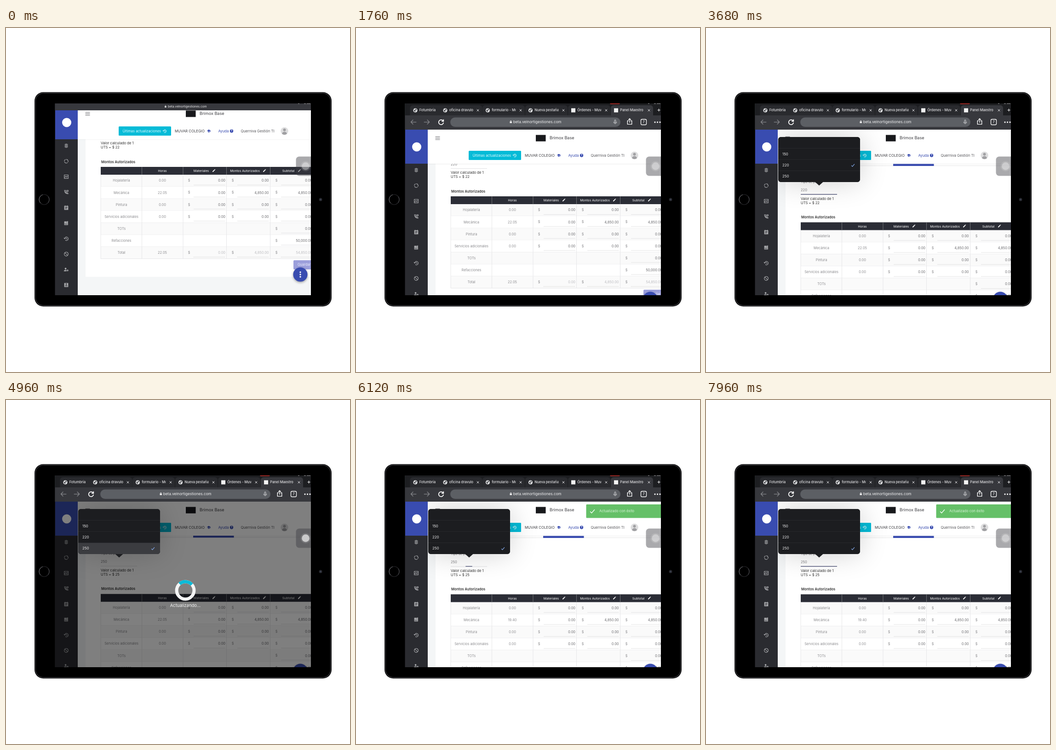
Recreate the animation shown at these times as an HTML page with a canvas. Size 748 px wide and 748 px high, loop 8000 ms.

```html
<!DOCTYPE html>
<html lang="es">
<head>
<meta charset="utf-8">
<style>
html, body { margin: 0; width: 100%; height: 100%; overflow: hidden; background: #fff; }
canvas { display: block; width: 100vw; height: 100vh; }
</style>
</head>
<body>
<canvas id="stage"></canvas>
<script>
const SIZE = 748, LOOP = 8000, BLUE = '#394cb0', DARK = '#2a2b30';
const canvas = document.getElementById('stage');
const g = canvas.getContext('2d');
const ratio = window.devicePixelRatio || 1;
canvas.width = canvas.height = SIZE * ratio;

const clamp = v => Math.max(0, Math.min(1, v));
const smooth = (t, a, b) => { const p = clamp((t - a) / (b - a)); return p * p * (3 - 2 * p); };
const mix = (a, b, p) => a + (b - a) * p;

function text(s, x, y, size, color, align = 'left', weight = 400) {
  g.font = `${weight} ${size}px Inter, Roboto, sans-serif`;
  g.textAlign = align;
  g.textBaseline = 'middle';
  g.fillStyle = color;
  g.fillText(s, x, y);
}
function rect(x, y, w, h, color, r = 0) {
  g.fillStyle = color;
  g.beginPath();
  g.roundRect(x, y, w, h, r);
  g.fill();
}
function circle(x, y, r, color) {
  g.fillStyle = color;
  g.beginPath();
  g.arc(x, y, r, 0, 7);
  g.fill();
}
function line(points, color, width = 1, dash = []) {
  g.strokeStyle = color;
  g.lineWidth = width;
  g.setLineDash(dash);
  g.beginPath();
  for (let i = 0; i < points.length; i += 2) g.lineTo(points[i], points[i + 1]);
  g.stroke();
  g.setLineDash([]);
}
function arc(x, y, r, from, to, color, width) {
  g.strokeStyle = color;
  g.lineWidth = width;
  g.beginPath();
  g.arc(x, y, r, from, to);
  g.stroke();
}
function layer(alpha, draw) {
  if (alpha <= 0) return;
  g.save();
  g.globalAlpha = alpha;
  draw();
  g.restore();
}

// Icons live on a 24-unit grid; true means filled instead of stroked.
const icons = {
  signal: ['M8 3h8v18H8zM10 7a2 2 0 1 0 4 0a2 2 0 1 0-4 0M10 12a2 2 0 1 0 4 0a2 2 0 1 0-4 0M10 17a2 2 0 1 0 4 0a2 2 0 1 0-4 0M3 5h4v4zM3 11h4v4zM3 16h4v4zM21 5h-4v4zM21 11h-4v4zM21 16h-4v4z', true],
  donut: ['M12 3.5A8.5 8.5 0 0 1 19.4 16.2M18 18A8.5 8.5 0 0 1 4 14.9M3.6 13A8.5 8.5 0 0 1 10 3.7'],
  graph: ['M3 4h18v16H3zM5 15l5-5 4 4 5-5'],
  call: ['M4 4c0 9 6 15 16 16v-4l-4-1-2 2c-3-1-5-4-6-6l2-2-1-5zM14 4h7v5h-4l-3 3z'],
  notes: ['M3 4h3V2h2v2h8V2h2v2h3v18H3zM7 8v2h10V8zM7 12v2h10v-2zM7 16v2h7v-2z', true],
  report: ['M3 4h12l-4 6 3 2 6-5v14H3zM6 13v5h2v-5zM10 15v3h2v-3zM14 14v4h2v-4zM18 2l3 3-6 6-3 1 1-4z', true],
  history: ['M5 13a8 8 0 1 1 3 6M1 9l4 4 4-3M13 8v5l4 2'],
  block: ['M3 12a9 9 0 1 0 18 0a9 9 0 1 0-18 0M6 6l12 12'],
  person: ['M5 8a4 4 0 1 0 8 0a4 4 0 1 0-8 0M1 20c0-5 4-6 8-6l4 1v5zM14 16a4 4 0 1 0 8 0a4 4 0 1 0-8 0M16.5 16a1.5 1.5 0 1 0 3 0a1.5 1.5 0 1 0-3 0', true],
  badge: ['M3 3h18v18H3zM9 8a3 3 0 1 0 6 0a3 3 0 1 0-6 0M6 17h12c0-5-12-5-12 0', true],
  cap: ['M12 3L1 9l11 6 9-5v7h2V9zM5 13v4l7 4 7-4v-4l-7 4z', true],
  pencil: ['M3 17l12-12 4 4-12 12H3zM16 4l2-2 4 4-2 2z', true],
  lock: ['M4 10h2V7a6 6 0 0 1 12 0v3h2v12H4zM9 10h6V7a3 3 0 0 0-6 0z', true],
  mic: ['M9 5a3 3 0 0 1 6 0v6a3 3 0 0 1-6 0zM5 11a7 7 0 0 0 14 0M12 18v4'],
  share: ['M8 9H4v13h16V9h-4M12 16V2M7 6l5-5 5 5'],
  reload: ['M19 7a9 9 0 1 0 2 7M21 2v7h-7'],
  check: ['M3 13l6 6L21 5'],
  close: ['M5 5l14 14M19 5L5 19'],
  back: ['M22 12H3M11 4l-8 8 8 8'],
  forward: ['M2 12h19M13 4l8 8-8 8']
};
function icon(name, x, y, size, color, width = 2.3) {
  const [path, filled] = icons[name], shape = new Path2D(path);
  g.save();
  g.translate(x - size / 2, y - size / 2);
  g.scale(size / 24, size / 24);
  g.fillStyle = g.strokeStyle = color;
  g.lineWidth = width;
  if (filled) g.fill(shape, 'evenodd'); else g.stroke(shape);
  g.restore();
}

function device() {
  rect(62, 139.5, 646, 466, '#0b0b0c', 19);
  g.strokeStyle = '#4a4a4e';
  g.lineWidth = 1;
  g.beginPath();
  g.roundRect(64, 141.5, 642, 462, 17.5);
  g.stroke();
  rect(65, 142.5, 640, 460, '#000', 17);
  arc(83, 373, 11, 0, 7, '#252528', 1.2);
  arc(83, 373, 11, 2.4, 4.4, '#77777b', 1);
  arc(83, 373, 11, -.6, .7, '#55555a', 1);
  circle(684, 373, 3.5, '#25262b');
  circle(684, 373, 1.6, '#414657');
}

const columns = [206, 295.5, 385, 479.5, 574.5, 680];
const money = [[398, 477], [493, 571.5], [588, 666]];

function table(c, hours) {
  const rows = [
    ['Hojalatería', '0.00', '0.00', '0.00', '0.00'],
    ['Mecánica', hours, '0.00', '4,850.00', '4,850.00'],
    ['Pintura', '0.00', '0.00', '0.00', '0.00'],
    ['Servicios adicionales', '0.00', '0.00', '0.00', '0.00'],
    ['TOTs', '', '', '', '0.00'],
    ['Refacciones', '', '', '', '50,000.00'],
    ['Total', hours, '0.00', '4,850.00', '54,850.00']
  ];
  rows.forEach((row, i) => {
    const top = c + 17 + i * 26.1, y = top + 13.2, total = i === 6;
    rect(206, top, 474, 26.1, i % 2 ? '#fff' : '#fafafa');
    line([206, top + 26.1, 680, top + 26.1], '#e6e6e8');
    text(row[0], 251, y, 7.4, '#8d8d90', 'center');
    text(row[1], 340, y, 7.4, '#8d8d90', 'center');
    money.forEach(([left, right], k) => {
      const value = row[k + 2];
      if (!value) return;
      text('$', left, y, 7.2, '#8a8a8d', 'center');
      text(value, right, y, 7.4, total ? '#bcbcc0' : '#67676b', 'right');
      line([left + 10, y + 9.3, right, y + 9.3], total ? '#bbb' : '#dcdcde', .8, total ? [1.5, 1.5] : []);
    });
  });
  columns.forEach(x => line([x, c + 17, x, c + 199.7], '#e6e6e8'));
  rect(206, c, 474, 17, '#2b2d36');
  columns.slice(1, 5).forEach(x => line([x, c, x, c + 17], '#85868a', .8));
  [['Horas', 340], ['Materiales', 424.5, 452], ['Montos Autorizados', 519.5, 562], ['Subtotal', 614, 638]]
    .forEach(([label, x, pen]) => {
      text(label, x, c + 9, 6.8, '#fff', 'center');
      if (pen) icon('pencil', pen, c + 8, 8, '#fff');
    });
}

function content(c, rate, focus, hours) {
  rect(156, 164, 507, 417, '#f4f6f7');
  rect(173, 164, 490, c + 239 - 164, '#fff');
  line([173, c - 123, 663, c - 123], '#e4e4e6');
  rect(407, c - 127, 88.5, 4.5, BLUE);
  text('Tipo de pago', 206, c - 88, 7, '#77777a');
  text(rate, 206, c - 69.5, 7.5, '#7d7d80');
  line([206, c - 60.5, 285, c - 60.5], '#d9d9dc', .8);
  if (focus > 0) line([245.5 - 39.5 * focus, c - 60.8, 245.5 + 39.5 * focus, c - 60.8], '#454a70', 1.3);
  text('Valor calculado de 1', 206, c - 51, 7.6, '#333');
  text('UTS = $ ' + rate / 10, 206, c - 42, 7.6, '#333');
  text('Montos Autorizados', 207, c - 10.7, 7.6, '#333', 'left', 600);
  table(c, hours);
  rect(625, c + 203, 60, 20, '#9c9fdb', 2);
  text('Guardar', 634, c + 213, 7.5, '#e9eafa');
}

function header(h) {
  layer(1, () => {
    g.shadowColor = 'rgba(0,0,0,.14)';
    g.shadowBlur = 3 * ratio;
    rect(156, h, 507, 74, '#fff');
  });
  [15.3, 18.5, 21.7].forEach(d => line([172.5, h + d, 182.5, h + d], '#66666a'));
  rect(391, h + 11.5, 21.5, 14, '#18191c');
  text('Brimox Base', 421, h + 18.2, 9.1, '#3c3c40');
  rect(245, h + 46, 114, 20, '#05bbd7', 1.5);
  text('Últimas actualizaciones', 253.5, h + 56.3, 7.5, '#e4fbff');
  icon('history', 345, h + 56, 9.5, '#fff');
  text('MUVAR COLEGIO', 367, h + 56.3, 7.8, '#3c3c40');
  icon('cap', 441, h + 56, 8.5, BLUE);
  text('Ayuda', 461.5, h + 56.3, 7.8, BLUE);
  circle(490.5, h + 56, 3.7, BLUE);
  text('?', 490.5, h + 56.3, 6, '#fff', 'center', 700);
  text('Querniva Gestión TI', 510.5, h + 56.3, 7.8, '#57575b');
  layer(1, () => {
    g.beginPath();
    g.arc(605.5, h + 56, 8.3, 0, 7);
    g.clip();
    rect(596, h + 46, 20, 20, '#dededf');
    circle(605.5, h + 53.5, 3, '#a0a0a3');
    circle(605.5, h + 63, 5.5, '#a0a0a3');
  });
}

const menu = ['signal', 'donut', 'graph', 'call', 'notes', 'report', 'history', 'block', 'person', 'badge'];
function sidebar(h) {
  rect(106, 164, 50, 417, DARK);
  rect(107, h, 49, 74, BLUE);
  circle(132, h + 37.5, 10, '#fff');
  menu.forEach((name, i) => icon(name, 131, h + 88 + i * 33.65, 11.5, '#a9aaad'));
}

function floatingButton(h) {
  layer(1, () => {
    g.shadowColor = 'rgba(0,0,0,.35)';
    g.shadowBlur = 5 * ratio;
    g.shadowOffsetY = 2 * ratio;
    circle(640, h + 368, 15.6, BLUE);
  });
  [-5, 0, 5].forEach(d => circle(640, h + 368 + d, 1.7, '#fff'));
}

const tabs = [
  ['Fotumbria', 129], ['oficina dravulo', 194, 265], ['formulario - Mo', 286.5, 358],
  ['Nueva pestaña', 379.5, 451], ['Órdenes - Muv', 472.5, 544], ['Panel Maestro', 565.5, 637]
];
function globe(x, y) {
  circle(x, y, 4.6, '#dfe0e2');
  g.fillStyle = '#393a3e';
  g.fill(new Path2D(`M${x - 3.4} ${y - 1.5}l3 1 1 2-2 2zM${x} ${y - 3.6}l3 1.5-1 2-2-1z`));
}
function toolbar(h, p) {
  const bottom = Math.max(179, h);
  rect(106, 164, 557, bottom - 164, '#37383d');
  layer(clamp((p - .5) / .4), () => {
    g.translate(0, h - 221);
    rect(106, 164, 557, 26, '#1d1e21');
    tabs.forEach(([label, x, close], i) => {
      const ink = '#e4e4e6', last = i === 5;
      rect(x - 11.5, 168, 92, last ? 24 : 22, last ? '#37383d' : '#292a2e', [6, 6, 0, 0]);
      if (i > 3) rect(x - 4.5, 174.5, 9, 9, '#f2f2f2'); else globe(x, 179);
      layer(1, () => {
        g.beginPath();
        g.rect(x, 168, 61, 22);
        g.clip();
        text(label, x + 8.7, 179.2, 7.4, ink, 'left', 500);
      });
      if (close) icon('close', close, 179, 8, ink, 3);
    });
    text('+', 658.5, 178.5, 13, '#fff', 'center');
    icon('back', 125, 204.5, 15, '#85868a', 2);
    icon('forward', 154, 204.5, 15, '#85868a', 2);
    icon('reload', 185, 204.5, 14, '#fff', 3);
    rect(205, 194.5, 370, 20.5, '#5c5f64', 10.2);
    icon('mic', 563.5, 204.5, 11, '#c4c5c8', 2.4);
    icon('share', 595, 203.5, 14, '#fff', 2.4);
    g.strokeStyle = '#fff';
    g.lineWidth = 1.3;
    g.beginPath();
    g.roundRect(619.5, 198.5, 12, 12, 2.5);
    g.stroke();
    text('7', 625.5, 205, 7, '#fff', 'center', 500);
    [650, 655.5, 661].forEach(x => circle(x, 204.8, 1.6, '#fff'));
  });
  const address = 'beta.velnortigestiones.com', y = 171 + 14.5 * p + 19 * p * p;
  const size = 6.6 + .4 * p + 1.2 * p * p;
  text(address, 394.2, y, size, '#f2f2f3', 'center');
  icon('lock', 394.2 - g.measureText(address).width / 2 - 5, y - .4, size * .8, '#f2f2f3');
  layer(smooth(p, .1, .4), () => rect(552, 163, 22, 2.6, '#c9302c', [0, 0, 5, 5]));
  [[635, 3], [648, 4], [654, 8]].forEach(([x, w]) => rect(x, 164, w, 1, '#a0a0a3'));
}

function popup(choice, pressed) {
  layer(g.globalAlpha, () => {
    g.beginPath();
    g.rect(156, 221, 507, 360);
    g.clip();
    g.shadowColor = 'rgba(0,0,0,.19)';
    g.shadowBlur = 60 * ratio;
    rect(157, 237, 178, 98, '#1c1d20', 6);
  });
  g.fillStyle = '#1c1d20';
  g.fill(new Path2D('M237 334.5h18l-9 8z'));
  rect(157, 237, 178, 98, '#1c1d20', 6);
  if (pressed) rect(157, 310.5, 178, 24.5, '#3b3c40', [0, 0, 6, 6]);
  [261.5, 286, 310.5].forEach(y => line([157, y, 335, y], '#2b2c30', .8));
  [150, 220, 250].forEach((n, i) => {
    const y = 274.2 + i * 24.4;
    text(n, 166, y, 7.8, '#ededee');
    if (n === choice) icon('check', 319.5, y, 9, '#86aef2', 3);
  });
}

function loading(t) {
  const turn = (t - 4960) / 1000 * 2 * Math.PI + .05;
  arc(390, 414, 18.9, 0, 7, '#f4f4f4', 7);
  arc(390, 414, 18.9, turn - Math.PI * .75, turn - Math.PI * .25, '#0bbbd8', 7);
  text('Actualizando...', 390, 447.5, 9.5, '#f4f4f4', 'center');
}

function toast() {
  rect(500.5, 227, 170, 29.5, '#65c068', 1.5);
  icon('check', 514, 242, 13, '#fff', 2.6);
  text('Actualizado con éxito', 529, 242.2, 7.5, '#dcf3dc');
}

function assist(active) {
  rect(630.5, 279.5, 42, 42, 'rgba(60,60,66,.44)', 7);
  circle(651.5, 300.5, 11, 'rgba(255,255,255,.12)');
  circle(651.5, 300.5, 8.3, `rgba(255,255,255,${mix(.35, .62, active)})`);
}

function render(t) {
  const p = smooth(t, 0, 880), h = mix(168, 221, p);
  const dim = smooth(t, 4650, 4850) - smooth(t, 5600, 5780);
  const c = 302 + 64 * smooth(t, 150, 1550) + 56.5 * smooth(t, 1950, 2700) - .8 * dim;
  const changed = t >= 4500;
  const focus = t < 4650 ? smooth(t, 2950, 3200) : smooth(t, 6050, 6310);

  g.setTransform(ratio, 0, 0, ratio, 0, 0);
  g.fillStyle = '#fff';
  g.fillRect(0, 0, SIZE, SIZE);
  device();
  g.save();
  g.beginPath();
  g.rect(106.5, 164, 556.5, 417);
  g.clip();
  content(c, changed ? 250 : 220, focus, t < 5600 ? '22.05' : '19.40');
  floatingButton(h);
  header(h);
  sidebar(h);
  layer(dim, () => {
    rect(106, h, 557, 420, 'rgba(0,0,0,.5)');
    loading(t);
  });
  toolbar(h, p);
  layer(smooth(t, 5820, 6000), toast);
  layer(smooth(t, 3000, 3200), () => popup(changed ? 250 : 220, t >= 4450 && t < 5600));
  assist(dim);
  g.restore();
}

const start = performance.now();
function tick() {
  render((performance.now() - start) % LOOP);
  requestAnimationFrame(tick);
}
tick();
</script>
</body>
</html>
```
